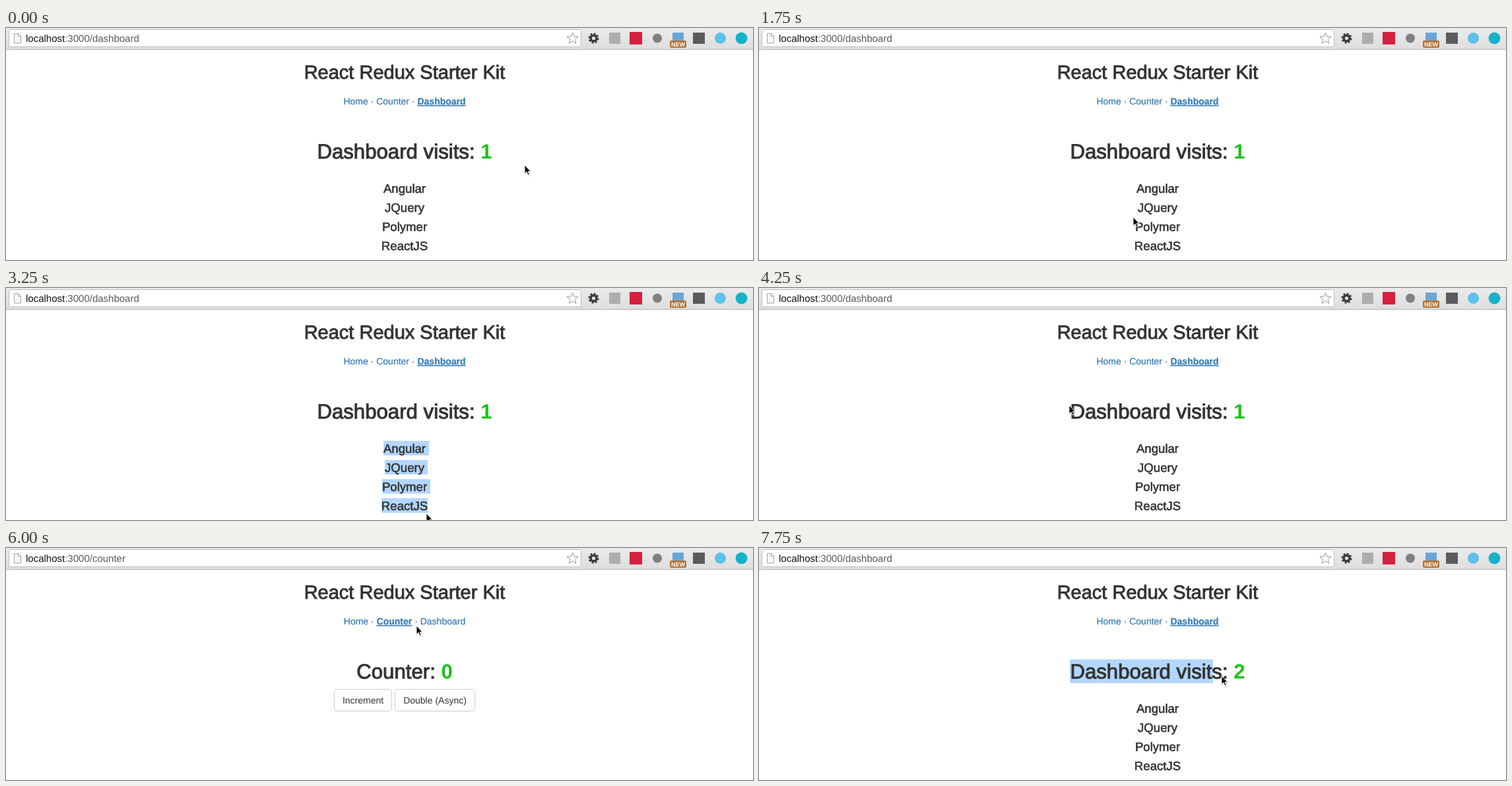
Recreate the animation shown at these times as an HTML page. Size 1132x352 px, loop 8 s.

```html
<!DOCTYPE html>
<html lang="en">
<head>
<meta charset="utf-8">
<title>Dashboard visits</title>
<style>
html, body { margin: 0; width: 100%; height: 100%; overflow: hidden; background: #fff; }
svg { display: block; font-family: "Liberation Sans", Arial, sans-serif; }
text { fill: #333; text-rendering: geometricPrecision; }
.medium { stroke: #333; stroke-width: .032em; text-anchor: middle; }
.num { font-weight: bold; fill: #19c319; stroke: none; }
.mid { text-anchor: middle; }
.link { fill: #337ab7; stroke: #337ab7; stroke-width: .2px; }
.active { font-weight: bold; text-decoration: underline; }
.hover { fill: #23527c; stroke: #23527c; text-decoration: underline; }
.btn { fill: #fff; stroke: #ccc; }
</style>
</head>
<body>
<svg width="1132" height="352" viewBox="0 0 1132 352">
  <defs>
    <linearGradient id="bar" x2="0" y2="1">
      <stop stop-color="#ebebeb"/><stop offset="1" stop-color="#dedede"/>
    </linearGradient>
  </defs>
  <rect width="1132" height="352" fill="#fff"/>

  <g id="toolbar">
    <rect width="1132" height="32" fill="url(#bar)"/>
    <rect y="32" width="1132" height="1" fill="#b4b4b4"/>
    <rect x="4.5" y="2.5" width="867" height="26" rx="2" fill="#fff" stroke="#bdbdbd"/>
    <path d="M12.5 8.5h6l4 4v10.500h-10zM18.500 8.500v4h4" fill="#f8f8f8" stroke="#a2a2a2"/>
    <text x="30" y="21" font-size="15"><tspan fill="#111">localhost</tspan><tspan id="path" fill="#5a5a5a"></tspan></text>
    <path id="star" fill="#fff" stroke="#999" stroke-linejoin="round"/>
    <g fill="none" stroke="#3c3c3c">
      <circle cx="890.500" cy="15.500" r="4.400" stroke-width="3.600"/>
      <circle cx="890.500" cy="15.500" r="6.800" stroke-width="2.600" stroke-dasharray="2.800 2.541"/>
    </g>
    <rect x="914" y="7" width="17" height="17" fill="#adadad"/>
    <rect x="945" y="6" width="19" height="19" fill="#d6203f"/>
    <circle cx="987" cy="15.500" r="7" fill="#808080"/>
    <rect x="1010" y="7" width="17" height="14" fill="#6ba5d8"/>
    <rect x="1006" y="19" width="25" height="11" rx="2" fill="#b57335"/>
    <text class="mid" x="1018.500" y="28" font-size="9" font-weight="bold" style="fill:#fff">NEW</text>
    <rect x="1041" y="7" width="18" height="17" fill="#5b5b5f"/>
    <circle cx="1082.500" cy="15.500" r="8.500" fill="#5fc0ea"/>
    <circle cx="1114.500" cy="15.500" r="9" fill="#18b2c9"/>
  </g>

  <g id="marks" fill="#b3d7ff"></g>

  <text class="medium" x="604" y="77" font-size="29">React Redux Starter Kit</text>
  <text class="mid" x="604" y="116" font-size="14"><tspan class="link">Home</tspan> · <tspan id="counterLink">Counter</tspan> · <tspan id="dashLink">Dashboard</tspan></text>
  <text class="medium" x="604" y="198" font-size="31.2"><tspan id="label"></tspan> <tspan id="value" class="num"></tspan></text>

  <g id="list" font-size="18.6"></g>
  <g id="buttons" font-size="14">
    <rect class="btn" x="497.500" y="214.500" width="87" height="33" rx="4"/>
    <text class="mid" x="541" y="236">Increment</text>
    <rect class="btn" x="589.500" y="214.500" width="121" height="33" rx="4"/>
    <text class="mid" x="650" y="236">Double (Async)</text>
  </g>

  <g id="cursor">
    <path d="M.5 1.500V15l3-2.600 2.100 4.500 2.400-1-2.100-4.500h4z" fill="#000" opacity=".18"/>
    <path d="M0 0V12.800l3-2.700 2 4.700 2.100-.9-2-4.500H9z" fill="#000" stroke="#fff" stroke-width=".9"/>
  </g>
</svg>
<script>
const LOOP = 8000;
const NS = "http://www.w3.org/2000/svg";
const $ = id => document.getElementById(id);

function add(parent, tag, attrs, text = "") {
  const el = document.createElementNS(NS, tag);
  for (const key in attrs) el.setAttribute(key, attrs[key]);
  el.textContent = text;
  parent.append(el);
}

// name, selection left, selection right
const items = [
  ["Angular", 572, 641], ["JQuery", 574, 639], ["Polymer", 570, 643], ["ReactJS", 569, 639]
];
items.forEach(([name], i) =>
  add($("list"), "text", { class: "medium", x: 604, y: 250 + 29 * i }, name));

const starPoints = Array.from({ length: 10 }, (_, i) => {
  const a = Math.PI * (i / 5 - .5), r = i % 2 ? 3.9 : 9;
  return (858.5 + r * Math.cos(a)).toFixed(1) + " " + (16 + r * Math.sin(a)).toFixed(1);
});
$("star").setAttribute("d", "M" + starPoints.join("L") + "Z");

// time, cursor x, cursor y, options
const steps = [
  [0, 786, 208],
  [500, 774, 180],
  [750, 755, 148],
  [1250, 684, 190],
  [1500, 604, 256],
  [1750, 567, 287],
  [2000, 567, 262],
  [2250, 570, 236],
  [2500, 572, 240],
  [2750, 598, 268, { rows: 2 }],
  [3000, 622, 304, { rows: 3 }],
  [3250, 637, 342, { rows: 4 }],
  [3500, 636, 342, { rows: 4 }],
  [3750, 586, 290],
  [4000, 496, 204],
  [4250, 470, 178],
  [4500, 690, 188, { head: 688 }],
  [4750, 747, 155],
  [5250, 690, 150],
  [5500, 590, 114, { hover: "counter" }],
  [5750, 588, 113, { hover: "counter", page: "counter" }],
  [6000, 622, 118, { page: "counter" }],
  [6250, 659, 115, { hover: "dashboard", page: "counter" }],
  [6500, 660, 115, { hover: "dashboard", visits: 2 }],
  [6750, 660, 115, { hover: "dashboard", visits: 2 }],
  [7000, 584, 146, { visits: 2 }],
  [7250, 496, 176, { visits: 2 }],
  [7500, 469, 182, { visits: 2 }],
  [7750, 701, 194, { visits: 2, head: 688 }]
];

function mark(x, y, right, height) {
  if (right > x) add($("marks"), "rect", { x, y, width: right - x, height });
}

function linkClass(name, page, hover) {
  return "link" + (name === page ? " active" : "") + (name === hover ? " hover" : "");
}

function show([, x, y, { page = "dashboard", visits = 1, hover, rows = 0, head } = {}]) {
  const home = page === "dashboard";
  $("cursor").setAttribute("transform", `translate(${x} ${y})`);
  $("path").textContent = ":3000/" + page;
  $("label").textContent = home ? "Dashboard visits:" : "Counter:";
  $("value").textContent = home ? visits : 0;
  $("list").style.display = home ? "" : "none";
  $("buttons").style.display = home ? "none" : "";
  $("counterLink").setAttribute("class", linkClass("counter", page, hover));
  $("dashLink").setAttribute("class", linkClass("dashboard", page, hover));

  $("marks").textContent = "";
  if (head) mark(471, 169, head, 36);
  items.slice(0, rows).forEach(([, left, right], i) =>
    mark(left, 232 + 29 * i, i === rows - 1 ? Math.min(right, x + 2) : right, 22));
}

let current;
function tick() {
  const t = performance.now() % LOOP;
  const step = steps.findLast(s => s[0] <= t);
  if (step !== current) show(current = step);
  requestAnimationFrame(tick);
}
tick();
</script>
</body>
</html>
```
